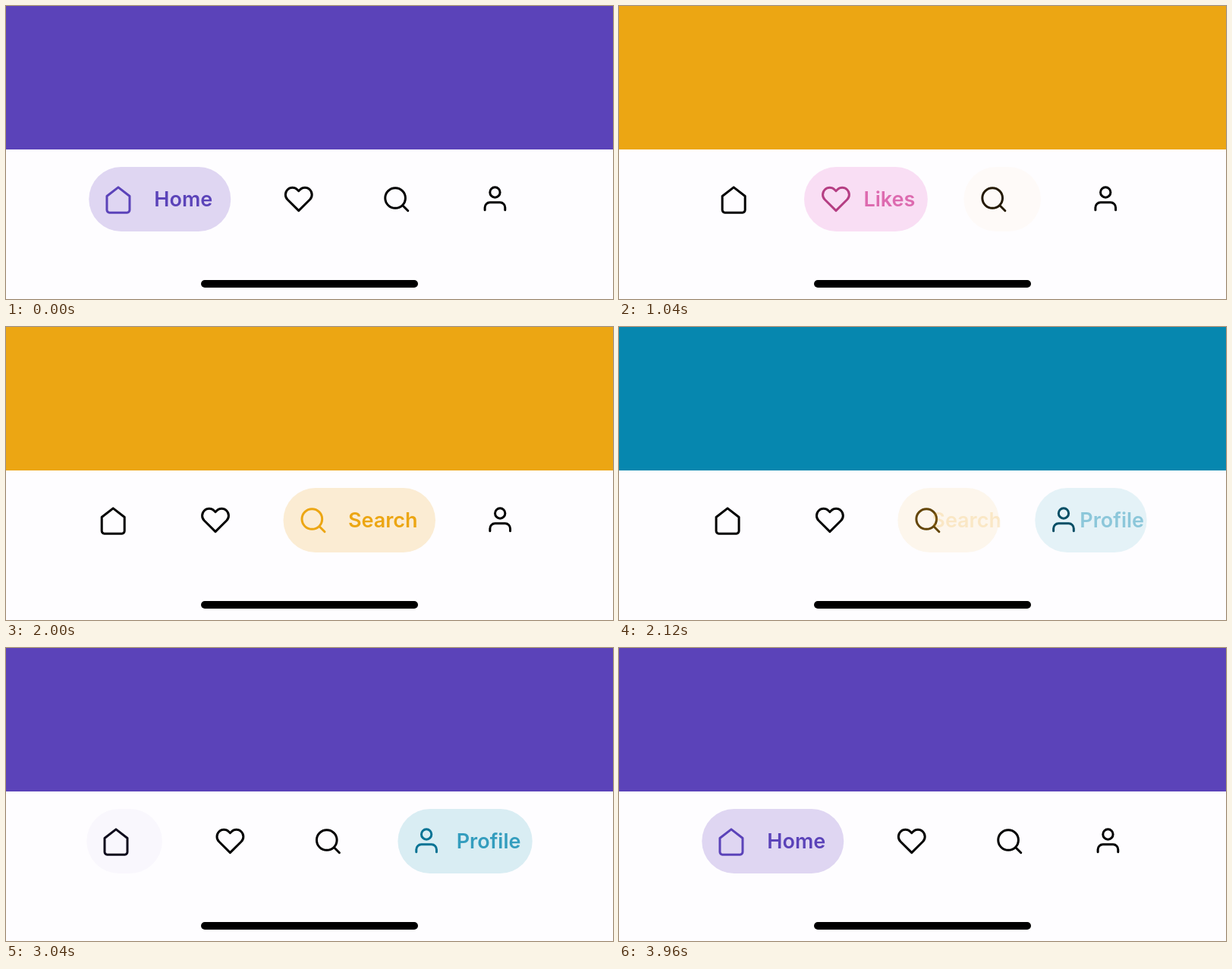
Recreate the animation shown at these times as an HTML page with a canvas. Size 800 by 386 pixels, loop 4 s.

```html
<!DOCTYPE html>
<html lang="en">
<head>
<meta charset="utf-8">
<title>Animated tab bar</title>
<style>
  html, body { margin: 0; width: 100%; height: 100%; overflow: hidden; background: #fefdff; }
  canvas { display: block; }
</style>
</head>
<body>
<canvas width="800" height="386"></canvas>
<script>
const ctx = document.querySelector('canvas').getContext('2d');

const LOOP = 4000, STEP = 1000, FIRST_TAP = 22, DURATION = 800;
const GAP = 47.5, CLOSED = 84, TOP = 212, HEIGHT = 85;
const ICON_SCALE = 40 / 24;

// x, y: icon origin (x relative to its pill)
const tabs = [
  { label: 'Home', rgb: [91, 67, 185], pill: [223, 214, 242], width: 187, x: 18.7, y: 235.5,
    icon: 'M3 9l9-7 9 7v11a2 2 0 0 1-2 2H5a2 2 0 0 1-2-2z' },
  { label: 'Likes', rgb: [213, 74, 155], pill: [248, 217, 242], width: 177, x: 22, y: 234.3,
    icon: 'M20.84 4.61a5.5 5.5 0 0 0-7.78 0L12 5.67l-1.06-1.06a5.5 5.5 0 0 0-7.78 7.78L12 21.23l8.84-8.84a5.5 5.5 0 0 0 0-7.78z' },
  { label: 'Search', rgb: [236, 166, 19], pill: [251, 236, 211], width: 200.5, x: 19.5, y: 234.7,
    icon: 'M3 11a8 8 0 1 0 16 0a8 8 0 1 0-16 0M21 21l-4.35-4.35' },
  { label: 'Profile', rgb: [6, 135, 175], pill: [210, 234, 241], width: 194, x: 17.7, y: 233.8,
    icon: 'M20 21v-2a4 4 0 0 0-4-4H8a4 4 0 0 0-4 4v2M8 7a4 4 0 1 0 8 0a4 4 0 1 0-8 0' },
];
for (const tab of tabs) tab.path = new Path2D(tab.icon);

const easeOutExpo = t => t >= 1 ? 1 : 1 - 2 ** (-10 * t);
const rgba = (rgb, alpha = 1) => `rgba(${rgb.join()},${alpha})`;

function roundRect(x, y, w, h, r, fill) {
  ctx.fillStyle = fill;
  ctx.beginPath();
  ctx.roundRect(x, y, w, h, r);
  ctx.fill();
}

function drawTab(tab, left, width, open) {
  roundRect(left, TOP, width, HEIGHT, HEIGHT / 2, rgba(tab.pill, open));

  ctx.save();
  ctx.translate(left + tab.x, tab.y);
  ctx.scale(ICON_SCALE, ICON_SCALE);
  ctx.lineWidth = 1.8;
  ctx.lineCap = ctx.lineJoin = 'round';
  ctx.strokeStyle = rgba(tab.rgb.map(c => Math.round(c * open)));
  ctx.stroke(tab.path);
  ctx.restore();

  // The label only shows once the pill is open far enough
  const center = (62 + width) / 2 - Math.max(0, 160 - width) * 0.26;
  ctx.fillStyle = rgba(tab.rgb, Math.max(0, (open - 0.3) / 0.7));
  ctx.fillText(tab.label, left + center, 264);
}

function draw(time) {
  const sinceTap = (time - FIRST_TAP + LOOP) % LOOP;
  const previous = Math.floor(sinceTap / STEP);
  const current = (previous + 1) % tabs.length;
  const progress = easeOutExpo(sinceTap % STEP / DURATION);
  const open = tabs.map((_, i) => i === current ? progress : i === previous ? 1 - progress : 0);
  const widths = tabs.map((tab, i) => CLOSED + (tab.width - CLOSED) * open[i]);

  ctx.fillStyle = '#fefdff';
  ctx.fillRect(0, 0, 800, 386);
  ctx.fillStyle = rgba(tabs[current].rgb);
  ctx.fillRect(0, 0, 800, 189);
  roundRect(257, 361, 286, 10, 5, '#000');

  ctx.font = '600 27px Inter, sans-serif';
  ctx.textAlign = 'center';
  let left = (800 - widths.reduce((a, b) => a + b) - 3 * GAP) / 2;
  tabs.forEach((tab, i) => {
    drawTab(tab, left, widths[i], open[i]);
    left += widths[i] + GAP;
  });
}

const origin = performance.now();
function tick() {
  draw((performance.now() - origin) % LOOP);
  requestAnimationFrame(tick);
}
draw(0);
requestAnimationFrame(tick);
</script>
</body>
</html>
```
